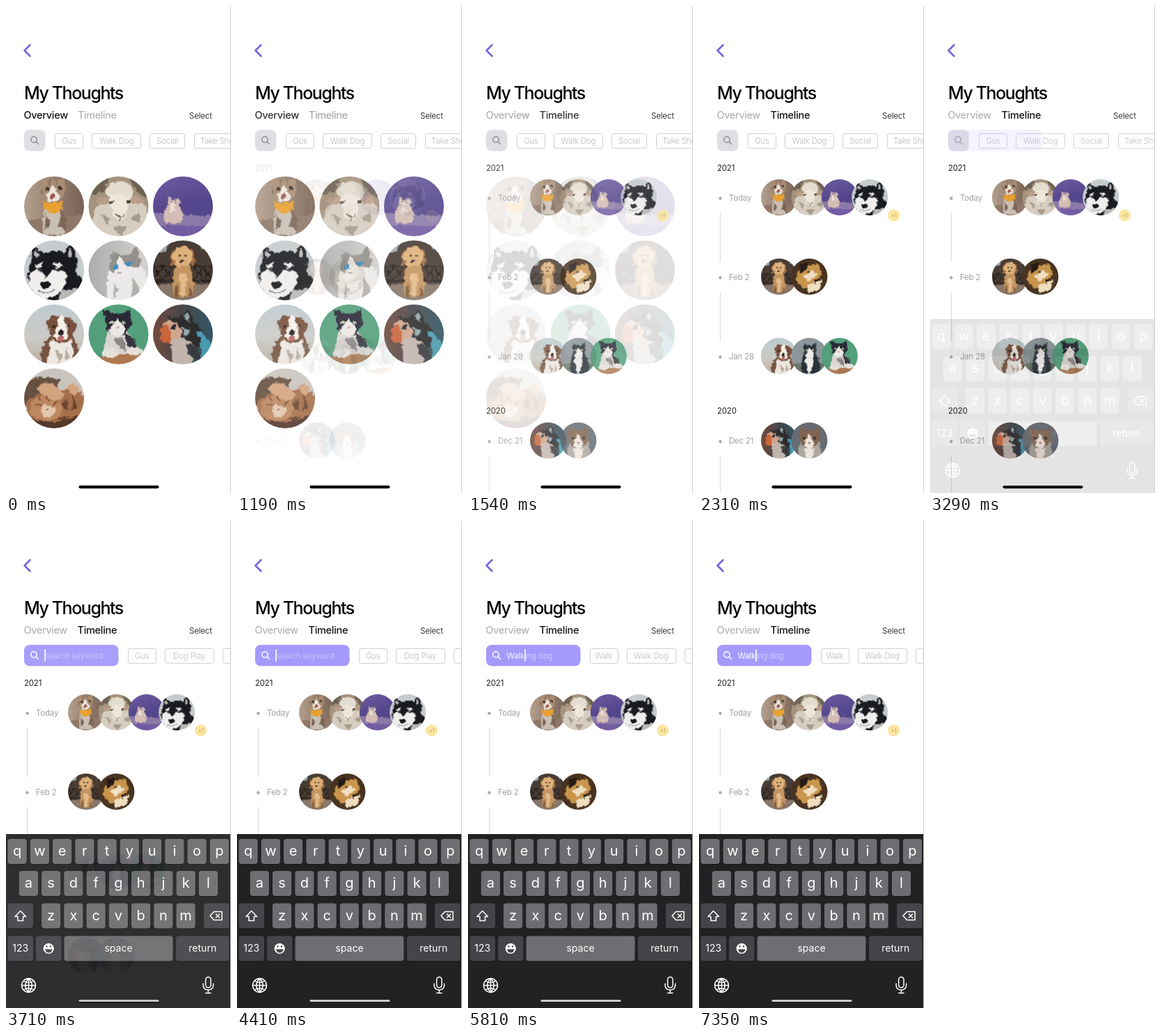
An HTML page for the animation above (7490 ms loop, 323x700 px).

```html
<!DOCTYPE html>
<html lang="en">
<head>
<meta charset="utf-8">
<title>My Thoughts</title>
<style>
html, body { margin: 0; width: 100%; height: 100%; overflow: hidden; background: #fff; }
svg { display: block; width: 100vw; height: 100vh; }
text { font: 400 11.5px Inter, Roboto, sans-serif; letter-spacing: -.2px; }
.title { font-size: 25px; font-weight: 500; letter-spacing: -1.45px; }
.tab { font-size: 14.5px; letter-spacing: -.3px; fill: #a9a9ab; }
.on { font-weight: 500; fill: #151515; }
.date { fill: #a3a3a5; }
.year { fill: #222; }
.chip { font-weight: 300; fill: #b9b9bb; text-anchor: middle; }
.box { fill: none; stroke: #d0d0d2; }
.line { fill: none; stroke-width: 1.5; stroke-linecap: round; stroke-linejoin: round; }
.key { fill: #fff; text-anchor: middle; letter-spacing: 0; }
.pic { clip-path: url(#disc); filter: url(#soft); }

/* Four screens joined by three 650 ms dissolves */
.overview > *, .timeline > *, .idle, .search, .empty, .typed {
  animation: 7490ms infinite both;
  animation-timing-function: cubic-bezier(.3333, 0, .6667, 1);
}
.overview > * { animation-name: leave1; }
.timeline > * { animation-name: enter1; }
.idle { animation-name: leave2; }
.search { animation-name: enter2; }
.empty { animation-name: leave3; }
.typed { animation-name: enter3; }
@keyframes leave1 { 0%, 14.152% { opacity: 1 } 22.83%, 100% { opacity: 0 } }
@keyframes enter1 { 0%, 14.152% { opacity: 0 } 22.83%, 100% { opacity: 1 } }
@keyframes leave2 { 0%, 42.056% { opacity: 1 } 50.734%, 100% { opacity: 0 } }
@keyframes enter2 { 0%, 42.056% { opacity: 0 } 50.734%, 100% { opacity: 1 } }
@keyframes leave3 { 0%, 70.227% { opacity: 1 } 78.905%, 100% { opacity: 0 } }
@keyframes enter3 { 0%, 70.227% { opacity: 0 } 78.905%, 100% { opacity: 1 } }
</style>
</head>
<body>
<svg viewBox="0 0 323 700" preserveAspectRatio="none">
<defs>
  <clipPath id="disc"><circle cx="50" cy="50" r="50"/></clipPath>
  <!-- Ragged, slightly soft edges for fur -->
  <filter id="soft" color-interpolation-filters="sRGB">
    <feTurbulence type="fractalNoise" baseFrequency=".13" numOctaves="2" seed="4"/>
    <feDisplacementMap in="SourceGraphic" scale="9" xChannelSelector="R" yChannelSelector="G"/>
    <feGaussianBlur stdDeviation=".9"/>
  </filter>
  <linearGradient id="taupe"><stop stop-color="#b9a593"/><stop offset="1" stop-color="#725c4f"/></linearGradient>
  <linearGradient id="dusk" x2=".3" y2="1"><stop stop-color="#7260a4"/><stop offset=".6" stop-color="#54468c"/></linearGradient>
  <linearGradient id="shore" x2="0" y2="1"><stop stop-color="#bccbd2"/><stop offset=".55" stop-color="#cccac6"/><stop offset="1" stop-color="#b5a799"/></linearGradient>
  <linearGradient id="neon"><stop stop-color="#7b4b3b"/><stop offset=".5" stop-color="#46474c"/><stop offset="1" stop-color="#2d5a68"/></linearGradient>
  <linearGradient id="mist"><stop stop-color="#a9aaa8"/><stop offset="1" stop-color="#d8d6d4"/></linearGradient>
  <path id="back" d="M-9-9h118v118h-118z"/>

  <g id="bandana" class="pic">
    <use href="#back" fill="url(#taupe)"/>
    <path fill="#8f7868" d="M-9 74L109 62V109H-9z"/>
    <path fill="#c9bfb4" d="M36 46Q28 80 33 98H68Q72 74 62 46z"/>
    <path fill="#7d6656" d="M61 52Q74 68 69 92L58 82zM36 60L42 78L35 92z"/>
    <path fill="#a98d74" d="M29 1L39 7H56L66 0L69 24Q62 44 48 44Q31 43 27 23z"/>
    <path fill="#7e6550" d="M40 6H44L43 18zM52 6H56L53 18zM28 20L35 27L29 30z"/>
    <path fill="#efe7dd" d="M47 14L60 32Q55 44 48 44Q38 43 36 32z"/>
    <circle cx="38" cy="20" r="3" fill="#3b3029"/><circle cx="59" cy="20" r="3" fill="#3b3029"/>
    <ellipse cx="48" cy="34" rx="5" ry="5" fill="#98574f"/>
    <path fill="#e9a02f" d="M31 38Q48 52 66 39L63 55Q48 67 35 56z"/>
  </g>
  <g id="sheep" class="pic">
    <use href="#back" fill="#a3937d"/>
    <path fill="#6e6253" d="M-9 34L24 26L40-9H-9zM62-9H109V42L82 27z"/>
    <path fill="#d6cdc0" d="M12 50Q50 14 94 48Q104 72 90 109H14Q2 72 12 50z"/>
    <path fill="#a79b8b" d="M20 62L36 70L30 82zM68 72L84 60L88 78zM40 84L64 82L54 100z"/>
    <ellipse cx="51" cy="24" rx="23" ry="16" fill="#e4dccf"/>
    <ellipse cx="25" cy="41" rx="13" ry="6" fill="#b99e89"/><ellipse cx="79" cy="40" rx="13" ry="6" fill="#b99e89"/>
    <path fill="#efe6da" d="M34 34Q52 23 70 34L63 66Q52 78 42 66z"/>
    <circle cx="38" cy="42" r="3" fill="#403730"/><circle cx="67" cy="42" r="3" fill="#403730"/>
    <path class="line" stroke="#7a6054" d="M46 63L52 69L59 63M52 69V74"/>
  </g>
  <g id="dusky" class="pic">
    <use href="#back" fill="url(#dusk)"/>
    <path fill="#8b7aa8" d="M-9 60Q40 64 109 66V109H-9z"/>
    <path fill="#725ca2" d="M-9 84Q50 78 109 86V109H-9z"/>
    <path fill="#d3bdb4" d="M26 34L31 38H38L42 34L45 49Q53 64 46 78H21Q16 61 24 49z"/>
    <path fill="#eee0d4" d="M29 42H39L36 60H27z"/>
    <circle cx="32" cy="43" r="1.4" fill="#57433f"/><circle cx="38" cy="43" r="1.4" fill="#57433f"/>
  </g>
  <g id="husky" class="pic">
    <use href="#back" fill="#c6cbcd"/>
    <path fill="#191b20" d="M5 66L11 32L14 8L33 22Q50 14 65 21L79 5Q92 28 87 52L103 72L90 109H50z"/>
    <path fill="#b9b8b7" d="M60 84L88 80L94 109H56zM17 14L25 24L18 30zM77 12L81 28L72 26z"/>
    <path fill="#efeeec" d="M10 55Q20 43 29 51L36 64L46 49Q60 44 71 55Q72 78 57 88Q38 103 20 89Q3 74 10 55z"/>
    <path fill="#e9e8e6" d="M19 42L30 36L32 42L21 47zM47 41L58 36L66 43L52 46z"/>
    <circle cx="25" cy="49" r="3" fill="#39434b"/><circle cx="56" cy="49" r="3" fill="#39434b"/>
    <ellipse cx="35" cy="74" rx="8" ry="6" fill="#15161a"/>
    <path class="line" stroke="#55565a" d="M24 85Q36 91 50 83"/>
  </g>
  <g id="pale" class="pic">
    <use href="#back" fill="url(#mist)"/>
    <path fill="#eae9e7" d="M37 45Q65 18 88 44Q106 68 94 109H34Q26 72 37 45z"/>
    <path fill="#b3b0ad" d="M74 62Q88 76 84 104L72 96zM40 72L50 82L42 100z"/>
    <path fill="#94908c" d="M39 18L52 24H68L80 8L87 36Q78 57 57 62Q37 57 35 44z"/>
    <path fill="#ecebe9" d="M53 26L60 42L82 46L70 64Q52 73 38 62L44 47z"/>
    <ellipse cx="45" cy="44" rx="4" ry="3.5" fill="#398fc1"/><ellipse cx="66" cy="39" rx="5" ry="4" fill="#398fc1"/>
    <path fill="#a58a86" d="M48 53H56L52 57z"/>
  </g>
  <g id="puppy" class="pic">
    <use href="#back" fill="#483c34"/>
    <path fill="#a1adb0" d="M-9-9H35L21 18H-9zM72-9H109V22L80 13z"/>
    <path class="line" stroke="#1e1918" stroke-width="3" d="M0 43H100M0 68H100M0 68L16 43L32 68M68 68L84 43L100 68M0 43L16 68L32 43M68 43L84 68L100 43"/>
    <path fill="#88776b" d="M-9 73H109V109H-9z"/>
    <path fill="#c49561" d="M39 42H62Q72 73 66 94H36Q29 72 39 42z"/>
    <path fill="#a66f42" d="M32 14Q26 38 33 44L42 22zM65 13Q72 32 67 44L57 23z"/>
    <ellipse cx="49" cy="27" rx="16" ry="18" fill="#deb17a"/>
    <circle cx="43" cy="25" r="2" fill="#362a22"/><circle cx="56" cy="25" r="2" fill="#362a22"/>
    <ellipse cx="49" cy="35" rx="4" ry="3" fill="#342a26"/>
    <path fill="#e2bb8c" d="M44 56H57L53 92H47z"/>
    <path fill="#805c3b" d="M38 74L44 94H36zM63 74L58 94H66z"/>
  </g>
  <g id="collie" class="pic">
    <use href="#back" fill="url(#shore)"/>
    <path fill="#755440" d="M42 53Q23 75 30 109H92Q96 72 77 48z"/>
    <path fill="#ece7e1" d="M47 57H77Q88 82 74 109H37Q38 75 47 57z"/>
    <path fill="#b9aa9d" d="M52 74L64 82L58 102zM70 72L76 88L68 94z"/>
    <path fill="#76503b" d="M36 34Q40 14 61 21Q80 16 88 37L81 49Q75 67 61 65Q47 64 43 44z"/>
    <path fill="#f4efe8" d="M58 20H65L74 53Q62 68 50 53z"/>
    <circle cx="50" cy="38" r="2.5" fill="#25201e"/><circle cx="72" cy="37" r="2.5" fill="#25201e"/>
    <ellipse cx="62" cy="47" rx="5" ry="4" fill="#27211f"/>
    <ellipse cx="62" cy="57" rx="5" ry="6" fill="#b86a69"/>
  </g>
  <g id="green" class="pic">
    <use href="#back" fill="#539f7b"/>
    <path fill="#d9d5d2" d="M34 43Q22 62 26 91H77Q78 60 63 42z"/>
    <path fill="#36343d" d="M60 46Q82 58 84 82H68z"/>
    <path fill="#8d8784" d="M42 58L58 56L64 78L52 72z"/>
    <path fill="#2b2938" d="M25 7L38 15H57L70 6L71 32Q64 52 49 53Q31 50 28 32z"/>
    <path fill="#ece8e5" d="M48 23L62 41Q56 54 48 54Q37 52 34 42z"/>
    <circle cx="38" cy="30" r="3" fill="#b9c6a0"/><circle cx="59" cy="30" r="3" fill="#b9c6a0"/>
    <path fill="#c08d88" d="M45 39H52L48 43z"/>
    <path fill="#ad7951" d="M-9 88L89 80L109 109H-9z"/>
    <ellipse cx="36" cy="82" rx="14" ry="8" fill="#e6e0da"/><ellipse cx="77" cy="78" rx="13" ry="7" fill="#e6e0da"/>
  </g>
  <g id="glow" class="pic">
    <use href="#back" fill="url(#neon)"/>
    <path fill="#2f2c2e" d="M22 18L32 24L44 20L60 9L68 30Q85 42 86 64L68 76L46 50z"/>
    <path fill="#d0a58d" d="M18 32Q26 22 38 30L48 46L46 62Q28 72 20 58z"/>
    <path fill="#c9643b" d="M12 42L24 32L30 46L28 62Q18 68 12 58z"/>
    <path fill="#93a9ac" d="M50 20L58 13L62 30zM46 38L62 44L54 54z"/>
    <path fill="#c2b5ae" d="M30 62Q51 46 72 72L62 109H34z"/>
    <path fill="#4b9bb0" d="M72 44Q100 52 98 84L78 92Q84 68 72 44z"/>
    <path fill="#3a3b41" d="M54 64L72 70L80 92L62 88z"/>
    <circle cx="34" cy="37" r="3.5" fill="#282a2e"/>
  </g>
  <g id="ginger" class="pic">
    <use href="#back" fill="#c9c5be"/>
    <path fill="#66503f" d="M-9 22Q35 8 60 20L50 42L-9 66z"/>
    <path fill="#a56f4a" d="M3 56Q27 34 52 40Q88 24 109 55V109H3z"/>
    <ellipse cx="37" cy="66" rx="28" ry="22" fill="#bd8760"/>
    <path fill="#d3a480" d="M22 36Q30 18 46 25L68 42Q64 56 46 52zM68 34Q80 16 92 34L84 46z"/>
    <path fill="#e3c8ae" d="M27 64Q42 58 53 69Q49 85 32 80z"/>
    <path fill="#6b432e" d="M62 62L72 48L74 72zM80 44L90 62L80 72zM56 82L76 78L66 92z"/>
    <path fill="#54392b" d="M10 82Q50 98 90 78V109H10z"/>
    <path class="line" stroke="#6f432d" d="M18 58L28 62M48 60L57 55M22 48L28 54M38 46L40 54"/>
    <path fill="#9d584e" d="M35 67H43L39 71z"/>
  </g>
  <g id="amber" class="pic">
    <use href="#back" fill="#483321"/>
    <path fill="#c9954d" d="M12 58Q17 27 42 23L75 13L85 43L62 71L33 84z"/>
    <path fill="#f0dec0" d="M32 49L58 31L73 45L48 64zM43 73L86 59L77 86L48 96z"/>
    <path fill="#241b17" d="M25 16L48 10L40 32L24 42zM64 60L74 54L66 72z"/>
    <circle cx="48" cy="38" r="4" fill="#35261d"/>
  </g>
  <g id="tuxedo" class="pic">
    <use href="#back" fill="#8c969a"/>
    <path fill="#697764" d="M-9 70H109V109H-9z"/>
    <path fill="#29313a" d="M35 13L45 22H58L69 12L68 44Q85 67 76 109H31Q24 65 36 44z"/>
    <path fill="#edebe9" d="M51 27L62 42L60 78L49 104L38 64L42 41z"/>
    <circle cx="43" cy="33" r="3" fill="#c9c878"/><circle cx="61" cy="33" r="3" fill="#c9c878"/>
  </g>
  <g id="tabby" class="pic">
    <use href="#back" fill="#666c73"/>
    <path fill="#ada7a0" d="M25 52H76L88 109H14z"/>
    <path fill="#80644f" d="M23 10L38 22H62L77 9L79 47Q70 72 50 74Q28 70 22 47z"/>
    <path fill="#eee5dc" d="M49 30L64 58Q58 73 50 73Q39 72 36 58zM36 72H65L56 104H42z"/>
    <circle cx="36" cy="43" r="4" fill="#2f302d"/><circle cx="65" cy="43" r="4" fill="#2f302d"/>
    <path fill="#a86f64" d="M45 55H55L50 60z"/>
  </g>

  <g id="lens" class="line"><circle cx="40" cy="192" r="4.2"/><path d="M43.2 195.2L46.5 198.5"/></g>
</defs>

<path d="M322.5 0V700" stroke="#d0d0d2"/>
<path d="M34.5 56L26.5 64L34.5 72" class="line" stroke="#7963dc" style="stroke-width:2.6"/>
<text class="title" x="26" y="134">My Thoughts</text>
<text x="263" y="162" fill="#3a3a3a">Select</text>
<rect x="104.5" y="689.2" width="115" height="4.2" rx="2.1" fill="#050505"/>

<g class="overview">
  <text class="tab on" x="25.5" y="162">Overview</text>
  <text class="tab" x="103" y="162">Timeline</text>
</g>

<g class="timeline">
  <text class="tab" x="25.5" y="162">Overview</text>
  <text class="tab on" x="102.5" y="162">Timeline</text>
  <text class="year" x="26" y="237">2021</text>
  <text class="year" x="26" y="586">2020</text>
  <path d="M30.5 297V368M30.5 411V482M30.5 647V700" stroke="#d9d9db"/>
  <g><circle cx="279.5" cy="301" r="8.6" fill="#fbe5a0"/><text x="279.5" y="304" text-anchor="middle" fill="#c3a75c" style="font-size:8px">+1</text></g>
</g>

<g class="idle">
  <rect x="26" y="178" width="30.5" height="30.5" rx="8" fill="#e0dee2"/>
  <use href="#lens" stroke="#8f8d93"/>
</g>

<g class="search">
  <rect x="26" y="178" width="135.5" height="30.5" rx="8" fill="#a599fc"/>
  <use href="#lens" stroke="#fff"/>
  <g id="keyboard"><rect y="450" width="322" height="250" fill="#222124"/></g>
  <g class="empty">
    <text x="56" y="197.5" fill="#c8c0fa">search keyword</text>
    <path d="M56 184.5V202" stroke="#fff" stroke-width="1.6"/>
  </g>
  <g class="typed">
    <text x="55.5" y="197.5" fill="#d2cbfc"><tspan fill="#fff">Walk</tspan><tspan dx="1">ing dog</tspan></text>
    <path d="M82 184.5V202" stroke="#fff" stroke-width="1.6"/>
  </g>
</g>
</svg>
<script>
const $ = s => document.querySelector(s);

function add(parent, tag, attrs, label) {
  const node = document.createElementNS('http://www.w3.org/2000/svg', tag);
  for (const k in attrs) node.setAttribute(k, attrs[k]);
  if (label) node.textContent = label;
  parent.append(node);
  return node;
}

const photo = (parent, name, x, y, size) =>
  add(parent, 'use', { href: '#' + name, transform: `translate(${x} ${y}) scale(${size / 100})` });

const chipBox = (parent, x, width) =>
  add(parent, 'rect', { class: 'box', x: x + .5, y: 183.5, width, height: 21, rx: 2.5 });

const chipText = (parent, x, label) =>
  add(parent, 'text', { class: 'chip', x, y: 198 }, label);

// Overview grid
'bandana sheep dusky husky pale puppy collie green glow ginger'.split(' ').forEach((name, i) =>
  photo($('.overview'), name, 26 + i % 3 * 92.5, 245 + Math.floor(i / 3) * 92, 86));

// Timeline days
const days = [
  ['Today', 275, 'bandana sheep dusky husky'],
  ['Feb 2', 389, 'puppy amber'],
  ['Jan 28', 503, 'collie tuxedo green'],
  ['Dec 21', 624.5, 'glow tabby']
];
for (const [label, y, names] of days) {
  const parent = $('.timeline');
  add(parent, 'circle', { cx: 30.5, cy: y + 1.5, r: 2.2, fill: '#aaaaac' });
  add(parent, 'text', { class: 'date', x: 43, y: y + 4.5 }, label);
  names.split(' ').forEach((name, i) => photo(parent, name, 89 + i * 43.4, y - 26, 52));
}

// Tags
const idleTags = [['Gus', 70, 40], ['Walk Dog', 123, 70], ['Social', 206, 50], ['Take Shower', 270, 84]];
for (const [label, x, w] of idleTags) {
  chipBox($('.idle'), x, w);
  chipText($('.idle'), x + w / 2 + .5, label);
}
[[175, 40], [228, 70], [311, 50]].forEach(([x, w]) => chipBox($('.search'), x, w));
for (const [group, labels] of [['.empty', ['Gus', 'Dog Play']], ['.typed', ['Walk', 'Walk Dog']]]) {
  labels.forEach((label, i) => chipText($(group), i ? 263 : 195, label));
}
chipText($('.search'), 336, 'Social');

// Keyboard
const board = $('#keyboard');
function key(x, y, w, label = '', size = 20, dark = false) {
  add(board, 'rect', { x, y: y + 1, width: w, height: 36, rx: 4, fill: '#151417' });
  add(board, 'rect', { x, y, width: w, height: 36, rx: 4, fill: dark ? '#454448' : '#6e6d71' });
  add(board, 'text', { class: 'key', x: x + w / 2, y: y + 18 + size * .32, style: `font-size:${size}px` }, label);
}
[['qwertyuiop', 2.5, 457], ['asdfghjkl', 18.8, 503], ['zxcvbnm', 51, 549.5]].forEach(([row, x, y]) =>
  [...row].forEach((c, i) => key(x + i * 32.25, y, 27.2, c)));
key(2.5, 549.5, 36.5, '', 14, true);
key(284, 549.5, 36.5, '', 14, true);
key(2.5, 596.5, 36.5, '123', 14, true);
key(43, 596.5, 36.5, '', 14, true);
key(83.5, 596.5, 156, 'space', 14);
key(244, 596.5, 76.5, 'return', 14, true);

const stroke = d => add(board, 'path', { d, class: 'line', stroke: '#fff' });
stroke('M20.7 560.5L28.5 568.5H24.5V574.5H17V568.5H13z');
stroke('M298.5 561.5H310V573.5H298.5L293 567.5zM301.5 565L306.5 570M306.5 565L301.5 570');
add(board, 'circle', { cx: 61.2, cy: 614.5, r: 7.6, fill: '#fff' });
add(board, 'path', { d: 'M56 615.5H66.5Q65.5 620.5 61.2 620.5Q57 620.5 56 615.5z', fill: '#454448' });
for (const cx of [58.5, 64]) add(board, 'circle', { cx, cy: 611.5, r: 1.2, fill: '#454448' });
stroke('M22.5 667.5a10 10 0 1 0 20 0a10 10 0 1 0 -20 0zM32.5 657.5V677.5M22.5 667.5H42.5M32.5 657.5Q23 667.5 32.5 677.5Q42 667.5 32.5 657.5M25 661Q32.5 666 40 661M25 674Q32.5 669 40 674');
stroke('M290.3 655.5a3.7 3.7 0 0 1 3.7 3.7V667a3.7 3.7 0 0 1 -7.4 0V659.2a3.7 3.7 0 0 1 3.7 -3.7zM283 665V667.5Q283.5 674 290.3 674Q297 674 297.6 667.5V665M290.3 674V678.5M286.5 678.5H294');
add(board, 'rect', { x: 104.5, y: 688.3, width: 115, height: 2.8, rx: 1.4, fill: '#d9d9da' });
</script>
</body>
</html>
```
